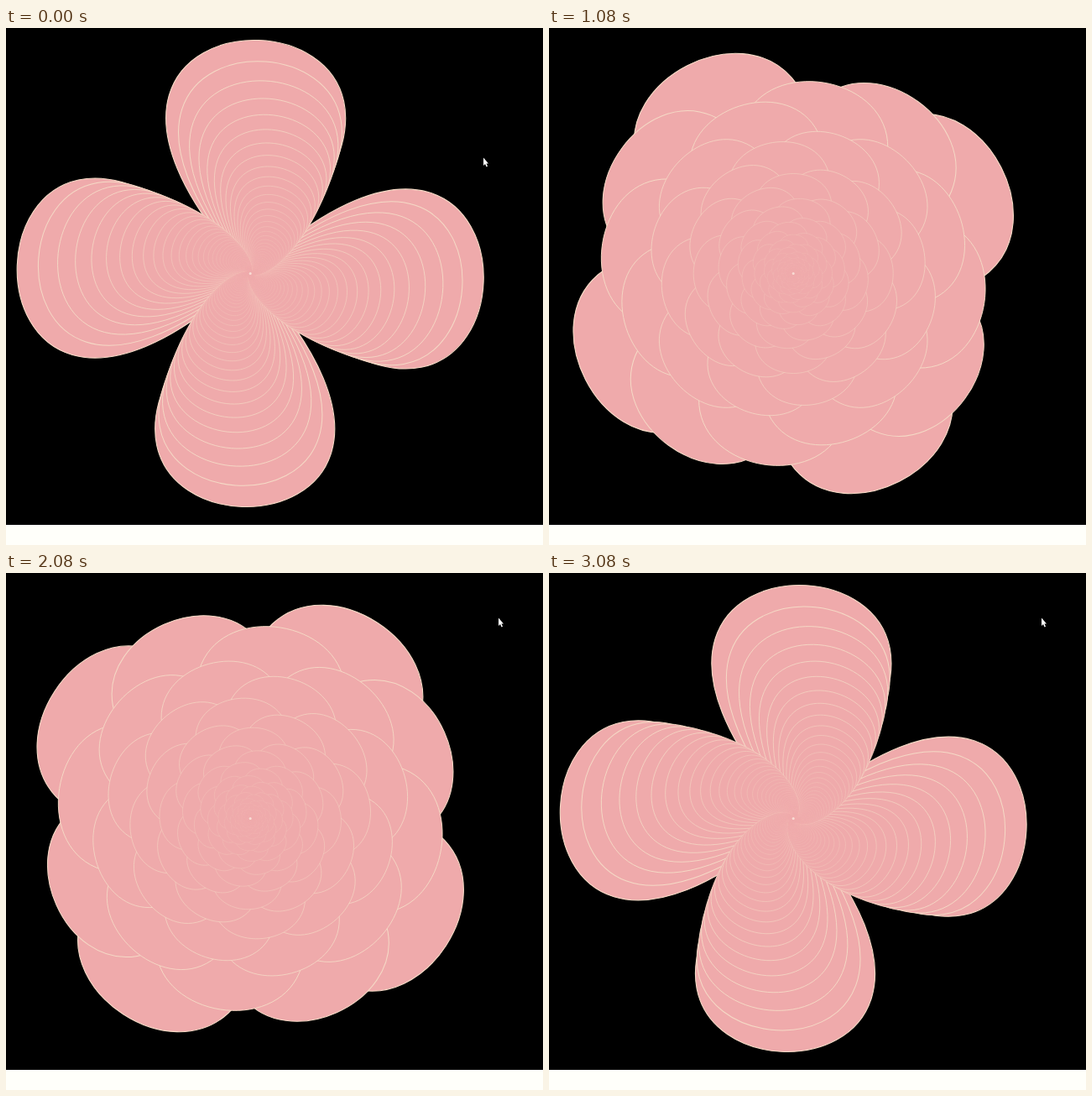
An HTML page that plays this animation: 640x616 px, repeating every 3160 ms.

```html
<!DOCTYPE html>
<html lang="en">
<head>
<meta charset="utf-8">
<title>Turning petals</title>
<style>
  html, body { margin: 0; width: 100%; height: 100%; overflow: hidden; background: #000; }
  svg { display: block; width: 640px; height: 616px; }
</style>
</head>
<body>
<svg viewBox="0 0 640 616">
  <rect width="640" height="616"/>
  <rect y="592" width="640" height="24" fill="#fffffa"/>
  <g transform="translate(291.2 292.5)">
    <g id="flower" fill="#efaaab" stroke="#f5dac6" stroke-width="1.1"></g>
    <circle r="1.5" fill="#f8dcd4"/>
  </g>
  <path id="cursor" d="M0 0V9.5L2 7.6L3.6 11L5 10.3L3.5 7H6Z" fill="#fff"/>
</svg>
<script>
  const LOOP = 3160, STEP = 250 / 3, LAST_STEP = 37;
  const LAYERS = 46, SHRINK = 0.91, REACH = 370.8;
  const flower = document.getElementById('flower');
  const cursor = document.getElementById('cursor');

  // One petal is a cubic loop that leaves and re-enters the centre; four make a layer.
  const corners = [[1, -1], [1, 1], [-1, 1], [-1, -1]].map(p => p.map(v => v * REACH));
  const petals = corners
    .map((corner, i) => `M0 0C${corner} ${corners[(i + 1) % 4]} 0 0Z`)
    .join('');

  const layers = Array.from({ length: LAYERS }, () => {
    const path = document.createElementNS('http://www.w3.org/2000/svg', 'path');
    path.setAttribute('d', petals);
    return flower.appendChild(path);
  });

  // Steady 2.5 degrees per step in whole degrees, after a slower start.
  const twistAt = step => Math.min(2 - step, -7 - Math.ceil(2.5 * (step - 5)));

  function placeCursor(step) {
    const shown = step === 0 || step >= 22;
    cursor.setAttribute('visibility', shown ? 'visible' : 'hidden');
    cursor.setAttribute('transform', step === 0 ? 'translate(569 154.5)' : 'translate(587 53.5)');
  }

  function draw(ms) {
    const step = Math.min(LAST_STEP, Math.floor((ms % LOOP + 3.4) / STEP));
    const twist = twistAt(step);
    layers.forEach((layer, i) => {
      layer.setAttribute('transform', `rotate(${twist * (i + 1)}) scale(${SHRINK ** i})`);
    });
    placeCursor(step);
  }

  const start = performance.now();
  function tick() {
    draw(performance.now() - start);
    requestAnimationFrame(tick);
  }
  tick();
</script>
</body>
</html>
```
